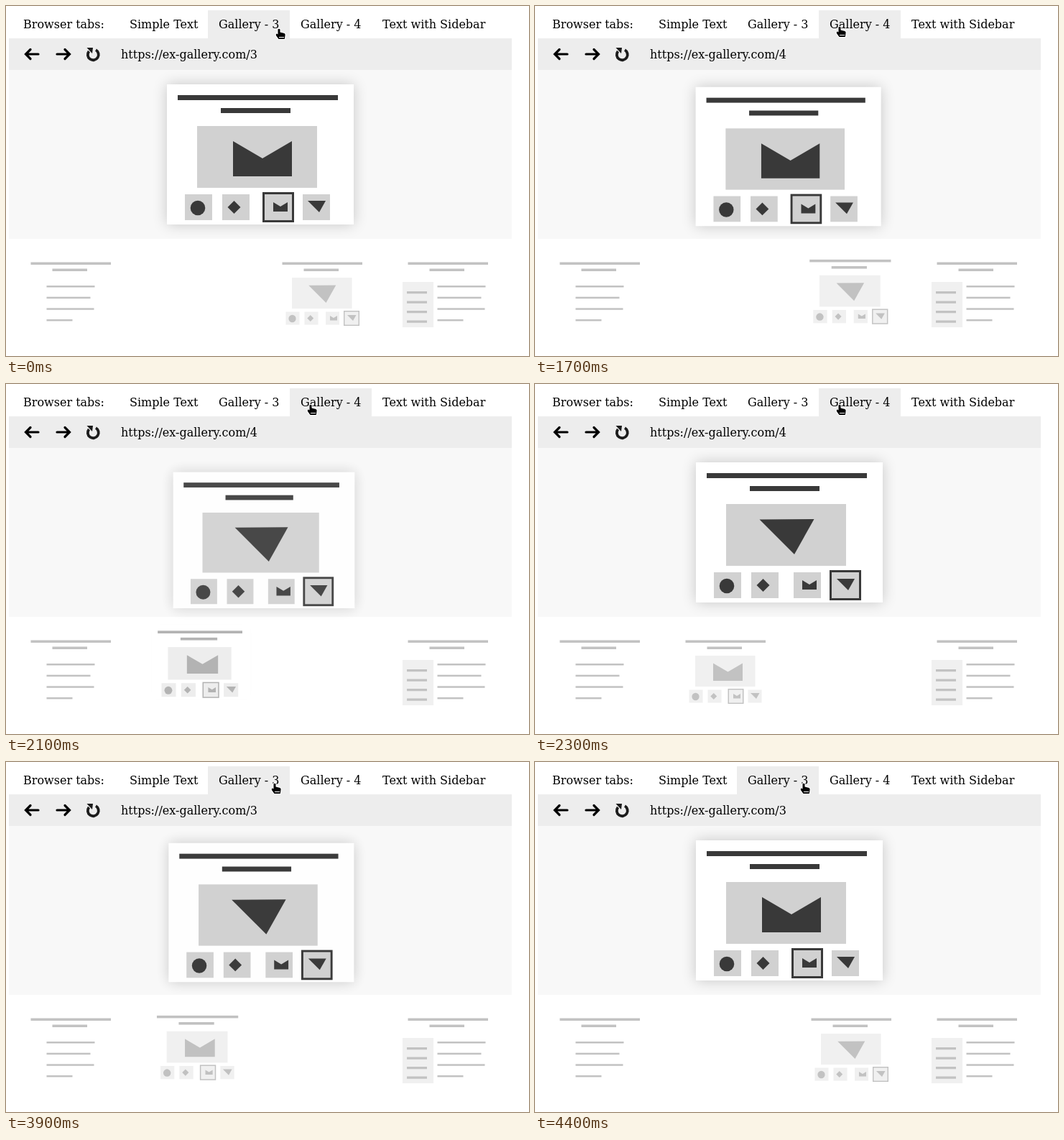
Recreate the animation shown at these times as an HTML page. Size 728x487 px, loop 4800 ms.

```html
<!DOCTYPE html>
<html lang="en">
<head>
<meta charset="utf-8">
<title>Browser tabs</title>
<style>
html, body { margin: 0; width: 100%; height: 100%; overflow: hidden; background: #fff; }
svg { position: absolute; left: 0; top: 0; width: 728px; height: 487px; }
span { position: absolute; top: 16px; font: 16px/19px "DejaVu Serif", serif; white-space: pre; }
#url { left: 160px; top: 58px; }
</style>
</head>
<body>
<svg viewBox="0 0 728 487">
  <defs>
    <filter id="blur" x="-20%" y="-25%" width="140%" height="150%"><feGaussianBlur stdDeviation="10"/></filter>
  </defs>
  <rect x="4" y="89" width="700" height="235" fill="#f8f8f8"/>
  <rect x="4" y="45" width="700" height="44" fill="#ededed"/>
  <rect id="tab" y="6" width="114" height="39" fill="#ededed"/>
  <g fill="none" stroke="#000" stroke-width="3.2" stroke-linecap="round">
    <path d="M45 67H28M34 60.5L27.5 67L34 73.5"/>
    <path d="M71 67H88M82 60.5L88.5 67L82 73.5"/>
    <path d="M125 61.2A7.5 7.5 0 1 1 115.5 63" stroke="#1c1c1c" stroke-width="3.8" stroke-linecap="butt"/>
  </g>
  <path d="M112.5 58H121L120 66Z" fill="#1c1c1c"/>
  <g id="cards"></g>
</svg>
<span style="left:24px">Browser tabs:</span>
<span style="left:172px">Simple Text</span>
<span style="left:296px">Gallery - 3</span>
<span style="left:410px">Gallery - 4</span>
<span style="left:524px">Text with Sidebar</span>
<span id="url"></span>
<svg viewBox="0 0 728 487">
  <g id="cursor">
    <path d="M3.5 1.5Q5 0 6.5 1.5V5.5L12.5 7Q13.8 7.6 13.6 9.5L12.8 15H4.5L.9 10Q.3 7.6 2 7.6L3.5 8.6Z"
      stroke="#fff" stroke-width="2" paint-order="stroke" stroke-linejoin="round"/>
    <path d="M5 12.5H12" stroke="#fff"/>
  </g>
</svg>
<script>
const LOOP = 4800, DARK = "#393939", LIGHT = "#d1d1d1";
const $ = id => document.getElementById(id);

const rect = (x, y, w, h, fill = DARK) =>
  `<rect x="${x}" y="${y}" width="${w}" height="${h}" fill="${fill}"/>`;
const poly = points => `<polygon points="${points}" fill="${DARK}"/>`;

const heading = rect(15, 15, 223, 7) + rect(75, 33, 97, 7);
const shapes = {
  3: poly("92,79 133,103 174,79 174,128 92,128"),
  4: poly("88.5,79.5 164.5,79 137,128")
};

function gallery(selected) {
  const slots = [25, 77, 136, 189];
  return heading + rect(42, 58, 167, 86, LIGHT) + shapes[selected] +
    slots.map(x => rect(x, 153, 38, 36, LIGHT)).join("") +
    `<circle cx="43" cy="172" r="10.3" fill="${DARK}"/>` +
    poly("93.5,162 102.5,171 93.5,180 84.5,171") +
    poly("148,164 158,170 168,164 168,177 148,177") +
    poly("196,162 221,162 212,178") +
    `<rect x="${slots[selected - 1] - 1.5}" y="151.5" width="41" height="39" fill="none" stroke="${DARK}" stroke-width="3"/>`;
}

const paragraph = x =>
  [134, 122, 132, 72].map((w, i) => rect(x, 80 + i * 31.3, w, 5)).join("");
const menu = [0, 1, 2, 3].map(i => rect(12, 96 + i * 27, 56, 6.5)).join("");
const sidebar = rect(0, 70, 86, 126, LIGHT) + menu;

function addCard(content) {
  const card = document.createElementNS("http://www.w3.org/2000/svg", "g");
  card.innerHTML = `<rect width="260" height="195" filter="url(#blur)"/>` +
    rect(0, 0, 260, 195, "#fff") + content;
  $("cards").append(card);
  return card;
}

const clamp = v => Math.min(1, Math.max(0, v));
const smooth = v => clamp(v) ** 2 * (3 - 2 * clamp(v));
const lerp = (a, b, p) => a + (b - a) * p;

// size and fade: 0 = thumbnail, 1 = opened
function place(card, homeX, size, fade) {
  card.setAttribute("transform",
    `translate(${lerp(homeX, 224, size)} ${lerp(349, 109, size)}) scale(${lerp(0.5, 1, size)})`);
  card.setAttribute("opacity", lerp(0.3, 1, fade));
  card.firstChild.setAttribute("opacity", 0.2 * fade);
}

place(addCard(heading + paragraph(59)), 27, 0, 0);
place(addCard(heading + sidebar + paragraph(97)), 552, 0, 0);
const card3 = addCard(gallery(3)), card4 = addCard(gallery(4));

const toFour = { click: 1700, begin: 1662, tick: 100, lag: 35 };
const toThree = { click: 3900, begin: 3762, tick: 200, lag: 0 };

function progress(swap, time) {
  if (time < swap.click) return [0, 0];
  const age = Math.floor(time / swap.tick) * swap.tick - swap.begin;
  return [smooth(age / 512), smooth((age - swap.lag) / 512)];
}

// share of a pointer move done, in 100 ms steps
const glide = (time, begin, steps) =>
  1 - (1 - clamp((Math.floor(time / 100) - begin / 100 + 1) / steps)) ** 1.2;

function draw(time) {
  const [sizeIn, fadeIn] = progress(toFour, time);
  const [sizeOut, fadeOut] = progress(toThree, time);
  const size = sizeIn - sizeOut, fade = fadeIn - fadeOut;
  const open = time >= toFour.click && time < toThree.click ? 4 : 3;
  const top = open === 4 ? card4 : card3;
  place(card3, 202, 1 - size, 1 - fade);
  place(card4, 377, size, fade);
  if ($("cards").lastChild !== top) $("cards").append(top);
  $("tab").setAttribute("x", open === 4 ? 395 : 281);
  $("url").textContent = "https://ex-gallery.com/" + open;

  const right = glide(time, 1100, 6), left = glide(time, 3200, 5);
  const x = lerp(lerp(375, 419, right), 369, left);
  const y = lerp(lerp(31, 28, right), 29, left);
  $("cursor").setAttribute("transform", `translate(${Math.round(x)} ${Math.round(y)})`);
}

const start = performance.now();
function tick() {
  draw((performance.now() - start) % LOOP);
  requestAnimationFrame(tick);
}
tick();
</script>
</body>
</html>
```
